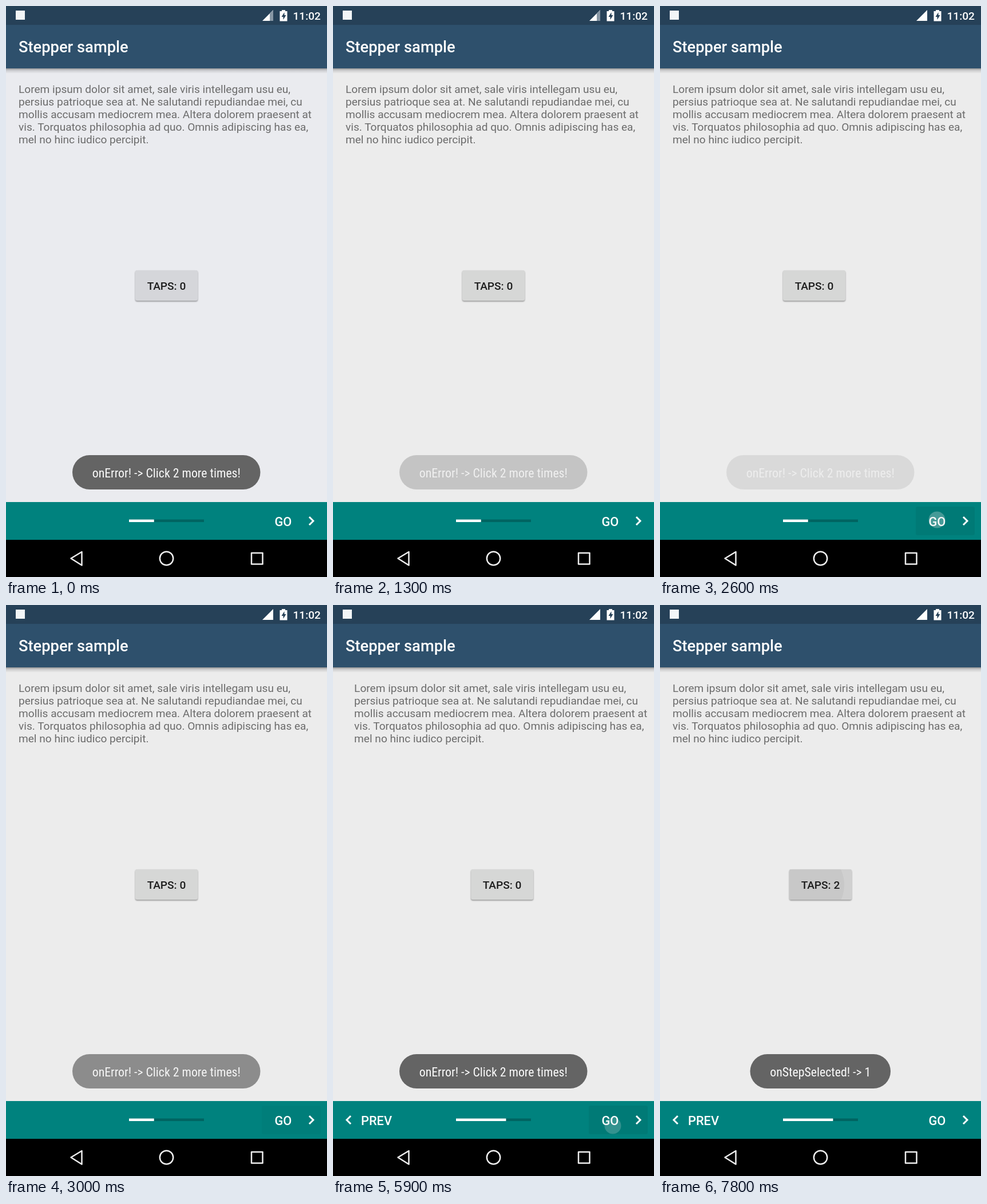
Recreate the animation shown at these times as an HTML page. Size 561 px wide and 998 px high, loop 8 s.

```html
<!DOCTYPE html>
<html lang="en">
<head>
<meta charset="utf-8">
<title>Stepper sample</title>
<style>
  html, body { margin: 0; width: 100%; height: 100%; overflow: hidden; background: #ececec; }
  svg { display: block; width: 561px; height: 998px; font-family: Roboto, sans-serif; }
  .body { font-size: 19.1px; fill: #6c6c6c; }
  .label { font-size: 19.1px; font-weight: 500; fill: #1c1c1c; text-anchor: middle; }
  .nav { font-size: 21.8px; font-weight: 500; fill: #fff; }
  .toast rect { fill: #646464; }
  .toast text { font-family: "Roboto Condensed", Roboto, sans-serif; font-stretch: 87.5%; font-size: 21.8px; fill: #fafafa; text-anchor: middle; }
  .line { fill: none; stroke: #fff; stroke-width: 3; }
  .keys { fill: none; stroke: #eee; stroke-width: 2.5; stroke-linejoin: round; }
</style>
</head>
<body>
<svg viewBox="0 0 561 998">
  <defs>
    <linearGradient id="fall" x2="0" y2="1">
      <stop offset="0" stop-opacity=".36"/>
      <stop offset=".4" stop-opacity=".13"/>
      <stop offset="1" stop-opacity="0"/>
    </linearGradient>
    <filter id="soft" x="-10%" y="-20%" width="120%" height="140%"><feGaussianBlur stdDeviation="1.3"/></filter>
    <clipPath id="face"><rect x="226" y="462" width="109" height="53" rx="3"/></clipPath>
  </defs>

  <rect id="back" width="561" height="998"/>
  <g id="pages"></g>

  <rect y="109" width="561" height="9" fill="url(#fall)"/>
  <rect y="33" width="561" height="76" fill="#2e506c"/>
  <rect width="561" height="33" fill="#264158"/>
  <text x="22" y="81" font-size="27.3" font-weight="500" fill="#fff">Stepper sample</text>

  <rect x="17" y="8" width="16" height="16" fill="#f2f5f7"/>
  <path d="M448 26H467V7Z" fill="#fff"/>
  <path id="weak" d="M461 26H467V7L461 13Z" fill="#8797a5"/>
  <path d="M482 7h6v2h3.500v17.500h-13v-17.500h3.500Z" fill="#fff"/>
  <path d="M486.500 11l-5 8h3v5l5-8h-3Z" fill="#264158"/>
  <text x="501.500" y="24" font-size="19.1" font-weight="500" fill="#fff">11:02</text>

  <rect y="867" width="561" height="66" fill="#00827e"/>
  <rect id="shade" x="447" y="875" width="103" height="50" rx="3" fill="#004d4a"/>
  <rect x="215" y="897.500" width="131" height="4.500" fill="#006461"/>
  <rect id="bar" x="215" y="897.500" height="4.500" fill="#fff"/>
  <g id="prev">
    <path class="line" d="M31 893l-7 7l7 7"/>
    <text class="nav" x="49" y="908.500">PREV</text>
  </g>
  <text class="nav" x="469.500" y="908.500">GO</text>
  <path class="line" d="M530 893l7 7l-7 7"/>
  <circle id="dot" r="14.500" fill="#e6e6e6"/>

  <g id="error" class="toast">
    <rect x="116" y="785" width="328.500" height="60" rx="30"/>
    <text x="280.300" y="824">onError! -&gt; Click 2 more times!</text>
  </g>
  <g id="chosen" class="toast">
    <rect x="157.500" y="785" width="245.500" height="60" rx="30"/>
    <text x="280.300" y="824">onStepSelected! -&gt; 1</text>
  </g>

  <rect y="933" width="561" height="65" fill="#000"/>
  <g class="keys">
    <path d="M113.500 965.500L132.500 954V977.500Z"/>
    <circle cx="280.500" cy="965.500" r="11.700"/>
    <rect x="429" y="956" width="19.500" height="19.500"/>
  </g>
</svg>
<script>
const $ = id => document.getElementById(id);
const clamp = x => Math.min(1, Math.max(0, x));
const set = (el, attrs) => { for (const k in attrs) el.setAttribute(k, attrs[k]); };
const fade = (id, value) => set($(id), { opacity: value });

// Piecewise linear value through [time, value] points.
function ramp(t, ...points) {
  let [t0, v0] = points[0];
  for (const [t1, v1] of points) {
    if (t < t1) return t <= t0 ? v0 : v0 + (v1 - v0) * (t - t0) / (t1 - t0);
    [t0, v0] = [t1, v1];
  }
  return v0;
}

const lines = [
  "Lorem ipsum dolor sit amet, sale viris intellegam usu eu,",
  "persius patrioque sea at. Ne salutandi repudiandae mei, cu",
  "mollis accusam mediocrem mea. Altera dolorem praesent at",
  "vis. Torquatos philosophia ad quo. Omnis adipiscing has ea,",
  "mel no hinc iudico percipit."
];
const copy = lines.map((s, i) =>
  `<text class="body" x="22" y="${151.5 + i * 22.2}">${s}</text>`).join("");
const page = `<g>${copy}<g class="button">
  <rect x="226" y="463.500" width="109" height="53" rx="3" opacity=".38" filter="url(#soft)"/>
  <rect class="plate" x="226" y="462" width="109" height="53" rx="3"/>
  <g clip-path="url(#face)">
    <rect class="press" x="226" y="462" width="109" height="53" fill="#d0d0d0"/>
    <circle class="ripple" cy="489" fill="#c8c8c8"/>
  </g>
  <text class="label" x="280.500" y="495.500"></text>
</g></g>`;
$("pages").innerHTML = page + page;

// Two taps per page; the second ripple stays on the button.
const pages = [...$("pages").children].map((el, i) => ({
  el,
  part: name => el.querySelector("." + name),
  taps: [[3800, 4300], [6700, 7400]][i],
  x: [251, 258][i]
}));

function drawPage(p, t, shift, shake, cool) {
  const count = p.taps.filter(s => t >= s + 100).length;
  const second = t >= p.taps[1];
  const age = t - p.taps[second ? 1 : 0];
  const glow = age < 0 ? 0 : second ? 1 : ramp(age, [250, 1], [450, 0]);
  set(p.el, { transform: `translate(${shift})` });
  set(p.part("button"), { transform: `translate(${shake})` });
  set(p.part("plate"), { fill: cool ? "#d5d6da" : "#d6d7d6" });
  set(p.part("press"), { opacity: glow });
  set(p.part("ripple"), { cx: p.x, r: 64 * clamp(age / 400), opacity: glow });
  p.part("label").textContent = "TAPS: " + count;
}

function draw(t) {
  const cool = t < 500;
  const slide = 1 - (1 - clamp((t - 5600) / 583)) ** 5;
  const shake = t > 2500 && t < 2900 ? -11 * Math.sin((t - 2500) / 400 * 6 * Math.PI) * -1 : 0;
  set($("back"), { fill: cool ? "#eaebef" : "#ececec" });
  drawPage(pages[0], t, -561 * slide, shake, cool);
  drawPage(pages[1], t, 561 * (1 - slide), 0, cool);

  fade("weak", t < 1400 ? 1 : 0);
  fade("prev", t >= 5600 ? 1 : 0);
  set($("bar"), { width: 43.7 * ramp(t, [5600, 1], [5900, 2]) });

  const again = t >= 5000;
  const press = t - (again ? 5500 : 2200);
  set($("dot"), { cx: again ? 489 : 484, cy: again ? 910 : 898 });
  fade("dot", press < 0 ? 0 : ramp(press, [400, again ? .22 : .3], [700, 0]));
  fade("shade", press < 0 ? 0 : ramp(press, [0, .08], [100, .16], [600, .14], [1000, 0]));

  const held = t >= 3000 && t < 3400;
  fade("error", held ? .7 : ramp(t, [800, 1], [1500, 0], [2510, 0], [3000, .7], [3400, 1], [7150, 1], [7600, 0]));
  fade("chosen", ramp(t, [7400, 0], [7800, 1]));
}

function tick() {
  draw(Math.floor(performance.now() % 8000 / 100) * 100);
  requestAnimationFrame(tick);
}
tick();
</script>
</body>
</html>
```
